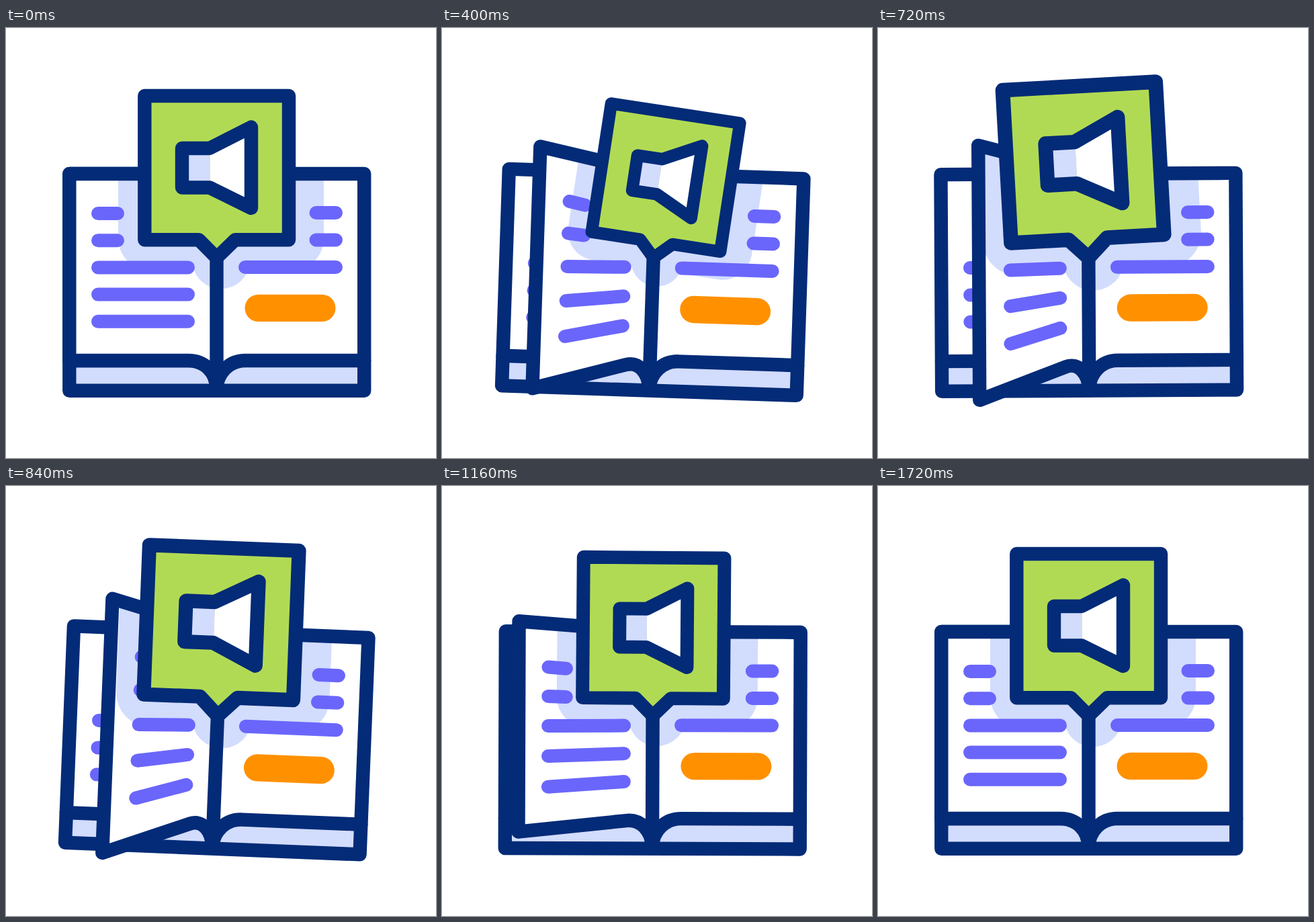
Animation of 640x640 px, one loop 2120 ms. Source, as an HTML page:

```html
<!DOCTYPE html>
<html lang="en">
<head>
<meta charset="utf-8">
<title>Open book with announcement</title>
<style>
  html, body { margin: 0; width: 100%; height: 100%; overflow: hidden; background: #fff; }
  svg { display: block; width: 100%; height: 100%; }
  .ink { fill: none; stroke: #032b77; stroke-width: 20.4; stroke-linecap: round; stroke-linejoin: round; }
  .text { fill: none; stroke: #6a66fb; stroke-width: 20; stroke-linecap: round; }
  .ray { fill: none; stroke: #ff9100; stroke-width: 20; stroke-linecap: round; }
  .paper { fill: #fff; }
  .tint { fill: #d2dcfd; }
</style>
</head>
<body>
<svg viewBox="0 0 640 640">
  <defs>
    <clipPath id="rightClip"><rect x="313.5" y="217" width="219.7" height="278"/></clipPath>
    <clipPath id="pageClip"><path class="pageShape"/></clipPath>
    <path id="shadow" d="M167 100V313A48 48 0 0 0 215 361H280A43 43 0 0 0 360 361H425A48 48 0 0 0 473 313V100Z"/>
  </defs>
  <g id="book">
    <path class="paper" d="M94.3 217H533.2V539.7H94.3Z"/>
    <path class="tint" d="M94.3 495H272C295 495 313 512 313.5 537C314 514 332 495 356 495H533.2V539.7H94.3Z"/>
    <g clip-path="url(#rightClip)"><use href="#shadow" class="tint withSign"/></g>
    <path class="text" d="M137 356H271M137 396.5H271M137 436.5H271"/>
    <path class="text" d="M461.5 275H491M461.5 315.5H491M356 356H491"/>
    <rect x="355.5" y="396.7" width="135" height="40.4" rx="20.2" fill="#ff9100"/>
    <path class="ink" d="M94.3 495H272C295 495 313 512 313.5 537C314 514 332 495 356 495H533.2"/>
    <path class="ink" d="M94.3 217H533.2V539.7H94.3Z"/>
    <path class="paper pageShape"/>
    <g clip-path="url(#pageClip)"><use href="#shadow" class="tint withSign"/></g>
    <path class="text" id="pageText"/>
    <path class="ink" id="pageEdge"/>
    <path class="ink" d="M313.5 342V539"/>
    <g class="withSign">
      <path class="ink" style="fill:#b1da54" d="M206.3 101H421V315.3H341L313.5 342L287 315.3H206.3Z"/>
      <path class="paper" d="M303.5 179L365 147.5V268L303.5 237.5Z"/>
      <path class="tint" d="M262 179H303.5V237.5H262Z"/>
      <path class="ink" d="M262 179H303L365 147.5V268L303 237.5H262Z"/>
      <path class="ray" id="rays"/>
    </g>
  </g>
</svg>
<script>
const LOOP = 2120, STEP = 40, END = 1720;

const $ = id => document.getElementById(id);
const setAll = (name, attr, value) =>
  document.querySelectorAll('.' + name).forEach(el => el.setAttribute(attr, value));

const clamp = x => Math.max(0, Math.min(1, x));
const linear = (t, from, to) => clamp((t - from) / (to - from));
const ease = (t, from, to) => (1 - Math.cos(Math.PI * linear(t, from, to))) / 2;

// Starts at rest, swings through each peak in turn, one per beat, then rests again.
function swing(t, start, beat, ...peaks) {
  let value = 0;
  [...peaks, 0].forEach((peak, i) => {
    const from = start + i * beat;
    value += (peak - (peaks[i - 1] || 0)) * ease(t, from, from + beat);
  });
  return value;
}

function drawPage(lift) {
  const mix = (a, travel) => a + travel * lift;
  const edge = `M313.5 217L${mix(94.3, 56)} ${mix(217, -43)}V${mix(495, 58)}` +
    `L${mix(272, 7)} ${mix(495, 9)}` +
    `C${mix(295, 3)} ${mix(495, 2)} ${mix(313, -1)} ${mix(512, 3)} 313.5 537`;
  $('pageEdge').setAttribute('d', edge);
  setAll('pageShape', 'd', edge + 'Z');

  let text = '';
  for (let i = 0; i < 5; i++) {
    const y = 276 + 40.2 * i;
    const bend = -17 + 8 * i + 1.1 * i * i;
    // The first two lines are short; their ends travel almost as far as their starts.
    const end = i < 2 ? `${mix(166, 53)} ${mix(y, bend * .65)}` : `271 ${mix(y, bend * .3)}`;
    text += `M${mix(137, 60)} ${mix(y, bend)}L${end}`;
  }
  $('pageText').setAttribute('d', text);
}

function drawRays(t) {
  const head = 25 * linear(t, 1180, 1360) + 20 * linear(t, 1360, 1680);
  const tail = 20 * linear(t, 1360, 1680);
  let path = '';
  if (head > 0 && t < END) for (const side of [-1, 0, 1]) {
    const angle = side * Math.PI / 4;
    const point = r => `${397 + r * Math.cos(angle)} ${204.7 + side * 47.7 + r * Math.sin(angle)}`;
    path += `M${point(tail)}L${point(head)}`;
  }
  $('rays').setAttribute('d', path);
}

function draw(time) {
  const t = Math.min(END, Math.floor(time % LOOP / STEP) * STEP);
  const bookTurn = swing(t, 0, 280, 5.9, -4.4, 2.3, .2);
  const signTurn = swing(t, 0, 330, 8, -3.3, 2.3, -1.6);
  const signSize = 1 + swing(t, 120, 310, -.1, .064, -.047, .038);
  $('book').setAttribute('transform', `rotate(${bookTurn} 313.5 378.5)`);
  setAll('withSign', 'transform',
    `translate(313.5 342) rotate(${signTurn}) scale(${signSize}) translate(-313.5 -342)`);
  drawPage(ease(t, 0, 560) - ease(t, 820, 1390));
  drawRays(t);
}

const start = performance.now();
function tick() {
  draw(performance.now() - start);
  requestAnimationFrame(tick);
}
tick();
</script>
</body>
</html>
```
